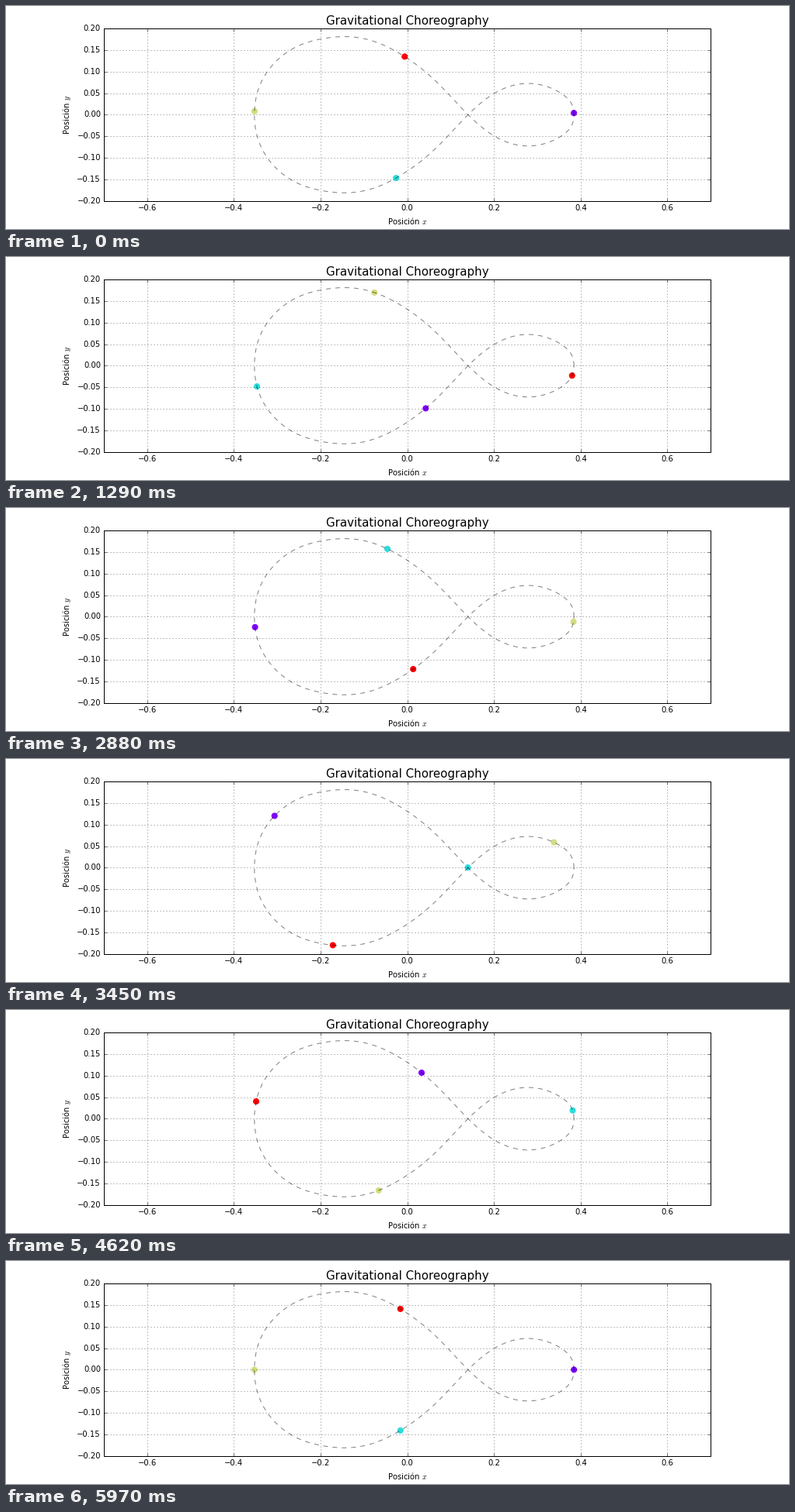
A matplotlib script that plays this animation: 1008 px wide and 288 px high, repeating every 6.03 s.

```python
import numpy as np
import matplotlib.pyplot as plt
from matplotlib.animation import FuncAnimation

STEPS = 200      # steps in one orbit
FRAMES = 201     # the last pose is held for one extra frame
INTERVAL = 30

# Harmonics of the orbit (order: amplitude / 1000). Multiples of four vanish,
# which keeps the centre of mass of the four bodies at rest.
COS_X = {1: 360.4, 2: 20.4, 3: 14.7, 5: -3.8, 6: -5.0, 7: -2.7, 10: 0.5}
SIN_Y = {1: -107.1, 2: 108.0, 3: 27.8, 5: -9.4, 6: -6.0, 7: -1.7, 9: 1.9, 10: 1.1}


def orbit(step):
    """Position on the shared path after the given number of steps."""
    angle = 2 * np.pi * np.asarray(step) / STEPS
    x = sum(a * np.cos(k * angle) for k, a in COS_X.items())
    y = sum(b * np.sin(k * angle) for k, b in SIN_Y.items())
    return x / 1000, y / 1000


plt.style.use("classic")
plt.rcParams.update({
    "font.family": "DejaVu Sans",
    "font.size": 10,
    "axes.labelsize": 10,
    "xtick.labelsize": 10,
    "ytick.labelsize": 10,
    "figure.facecolor": "white",
    "savefig.facecolor": "white",
    "savefig.dpi": "figure",
})

fig = plt.figure(figsize=(14, 4), dpi=72)
ax = fig.add_axes([0.125, 0.125, 0.775, 0.775])
ax.set_xlim(-0.7, 0.7)
ax.set_ylim(-0.2, 0.2)
ax.grid(True)
ax.set_title("Gravitational Choreography", fontsize=15)
ax.set_xlabel("Posición $x$")
ax.set_ylabel("Posición $y$")

ax.plot(*orbit(np.linspace(0, STEPS, 401)), "k--", lw=1, alpha=0.5)

offsets = np.arange(4) * STEPS / 4
colors = plt.cm.rainbow(np.linspace(0, 1, 4))
bodies = ax.scatter(*orbit(offsets + 1), s=50, c=colors, edgecolors=colors,
                    linewidths=1, zorder=1)


def update(frame):
    step = min(frame, STEPS - 1) + 1
    bodies.set_offsets(np.column_stack(orbit(offsets + step)))
    return bodies,


anim = FuncAnimation(fig, update, frames=FRAMES, interval=INTERVAL,
                     init_func=lambda: update(0), repeat=True, repeat_delay=0)
plt.show()
```
